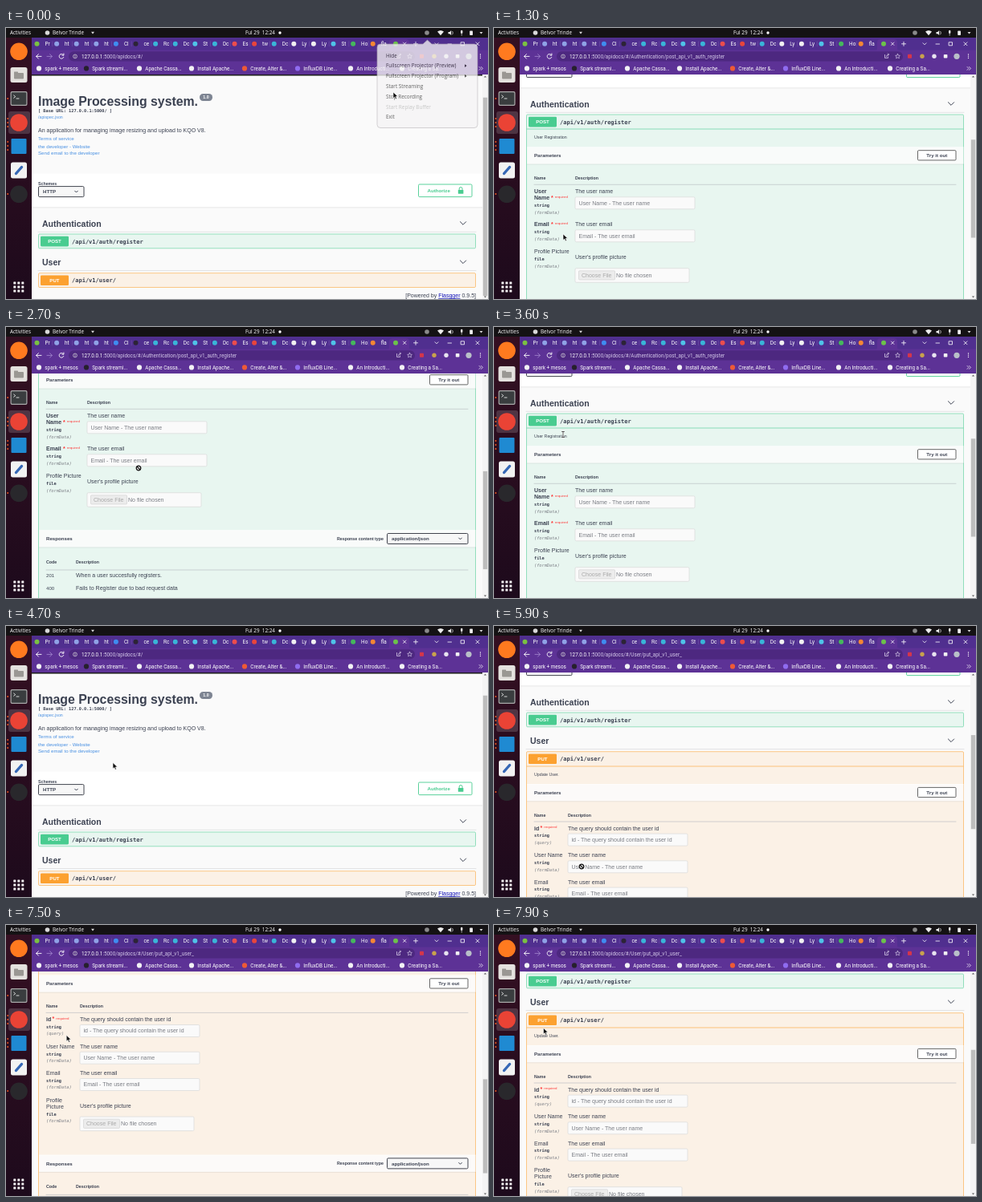
Recreate the animation shown at these times as an HTML page. Size 600 by 338 pixels, loop 8000 ms.

```html
<!DOCTYPE html>
<html lang="en">
<head>
<meta charset="utf-8">
<title>API docs walkthrough</title>
<style>
html, body { margin: 0; width: 100%; height: 100%; overflow: hidden; background: #fafafa; }
svg { display: block; width: 600px; height: 338px; font-family: "Liberation Sans", Arial, sans-serif; fill: #3b4151; }
.mono { font-family: "DejaVu Sans Mono", "Liberation Mono", monospace; }
.ui { font-family: "Open Sans", "Noto Sans", sans-serif; }
.tab { font-family: Roboto, "Open Sans", sans-serif; fill: #fff; }
.b { font-weight: bold; }
.i { font-style: italic; }
.white { fill: #fff; }
.link { fill: #4990e2; }
.soft { fill: #7a7d84; }
.req { fill: #f33; }
.line { fill: none; stroke-linecap: round; stroke-linejoin: round; }
</style>
</head>
<body>
<svg id="stage" viewBox="0 0 600 338"></svg>
<script>
const LOOP = 8000, STEP = 100;
const GREEN = '#49cc90', ORANGE = '#fca130', INK = '#3b4151';
const FRAME = '#502f8f', TOOLBAR = '#5d3296', FIELD = '#4d2880';
// text sizes of the docs page
const XS = 4.4, S = 5.27, M = 6.15, L = 7.03, XL = 10.54;

const text = (x, y, s, size, cls = '', extra = '') =>
  `<text x="${x}" y="${y + size * 0.35}" font-size="${size}" class="${cls}" ${extra}>${s}</text>`;
const rect = (x, y, w, h, fill, extra = '') =>
  `<rect x="${x}" y="${y}" width="${w}" height="${h}" fill="${fill}" ${extra}/>`;
const dot = (x, y, r, fill, extra = '') =>
  `<circle cx="${x}" cy="${y}" r="${r}" fill="${fill}" ${extra}/>`;
const path = (d, stroke, w = 0.9) =>
  `<path class="line" d="${d}" stroke="${stroke}" stroke-width="${w}"/>`;
const shape = (d, fill, extra = '') => `<path d="${d}" fill="${fill}" ${extra}/>`;
const group = (id, body) => `<g id="${id}">${body}</g>`;
const hline = (y, x1 = 50, x2 = 575, c = '#b4b8bd') => path(`M${x1} ${y}H${x2}`, c, 0.6);
const chevron = (x, y, r, c = INK, w = 1) => path(`M${x - r} ${y - r / 2}l${r} ${r} ${r} ${-r}`, c, w);

function select(x, y, w, label) {
  return rect(x, y, w, 13, '#f7f7f7', 'rx="1.3" stroke="#41444e" stroke-width="1"') +
    text(x + 5.5, y + 6.5, label, M, 'b') + chevron(x + w - 9.5, y + 6.5, 1.8);
}

function band(y, label) {
  return rect(41, y + 1, 543.5, 21.3, '#000', 'opacity=".07"') +
    rect(41, y, 543.5, 21.3, '#fff', 'opacity=".85"') + text(50, y + 10.8, label, M, 'b');
}

function section(y, name) {
  return text(45, y, name, XL, 'b') + chevron(569, y - 0.5, 3.6) + hline(y + 10.3, 40, 585, '#d0d2d6');
}

function bar(y, method, url, color) {
  return rect(43, y + 2.8, 35, 12.6, color, 'rx="1.3"') +
    text(60.5, y + 9.1, method, M, 'b white', 'text-anchor="middle"') +
    text(82, y + 9.2, url, L, 'b mono');
}

function field(x, y, w, label) {
  return rect(x, y - 7.5, w, 15, '#fafafa', 'rx="1.5" stroke="#d9d9d9" stroke-width=".7"') +
    text(x + 4.5, y, label, L, 'soft');
}

function fileField(x, y) {
  return rect(x, y - 8.8, 142, 17.6, '#fafafa', 'rx="1.5" stroke="#d9d9d9" stroke-width=".7"') +
    rect(x + 4.5, y - 5.7, 45, 11.2, '#ececec', 'rx="1" stroke="#cfcfcf" stroke-width=".6"') +
    text(x + 8, y, 'Choose File', L, '', 'fill="#aaa"') + text(x + 51, y, 'No file chosen', L, 'soft');
}

function param(x, y, p) {
  const lines = p.name.split('|');
  const last = y + (lines.length - 1) * 8;
  let out = lines.map((s, n) => text(50, y + n * 8, s, L, p.star ? 'b' : '')).join('');
  if (p.star) out += text(p.star, last - 0.8, '*', L, 'req b') + text(p.star + 4.8, last - 1.5, 'required', XS, 'req');
  out += text(50, last + 9.3, p.type || 'string', S, 'b mono');
  out += text(50, last + 17.8, `(${p.from || 'formData'})`, S, 'i mono soft');
  if (p.type) {
    const mid = y + 7;
    return out + text(x, mid, p.text, L) + fileField(x, mid + 22.5);
  }
  return out + text(x, y, p.text, L) + field(x, y + 14.3, 149, p.hint);
}

function details(y, note, descX, params, resY, responses) {
  return text(50, y + 28, note, S) + band(y + 40.3, 'Parameters') +
    rect(527.5, y + 44.7, 47.5, 12.2, '#fff', 'rx="1.1" stroke="#555" stroke-width=".9"') +
    text(551.3, y + 50.8, 'Try it out', M, 'b', 'text-anchor="middle"') +
    text(50, y + 79, 'Name', S, 'b') + text(descX, y + 79, 'Description', S, 'b') + hline(y + 87.3) +
    params.map(p => param(descX, p.y, p)).join('') +
    band(resY - 10.8, 'Responses') + text(412, resY, 'Response content type', S, 'b') +
    select(474.5, resY - 6.5, 100.5, 'application/json') +
    text(50, resY + 29, 'Code', S, 'b') + text(87, resY + 29, 'Description', S, 'b') + hline(resY + 39) +
    responses.map((r, n) =>
      text(50, resY + 46 + n * 16, r[0], M) + text(87, resY + 46 + n * 16, r[1], L)).join('');
}

const box = (id, y, color) =>
  rect(40.5, y, 544, 17.8, color,
    `id="${id}" rx="1.3" fill-opacity=".1" stroke="${color}" stroke-width=".8" stroke-opacity=".7"`);

const picture = { type: 'file', text: "User's profile picture" };
const nameHint = { text: 'The user name', hint: 'User Name - The user name' };
const mailHint = { text: 'The user email', hint: 'Email - The user email' };

const postBody = hline(275, 41, 584, GREEN) + details(257, 'User Registration', 101, [
  { y: 353, name: 'User|Name', star: 71, ...nameHint },
  { y: 394, name: 'Email', star: 71, ...mailHint },
  { y: 428, name: 'Profile Picture', ...picture }
], 506, [['201', 'When a user succesfully registers.'], ['400', 'Fails to Register due to bad request data']]);

const putBody = hline(324, 41, 584, ORANGE) + details(305.7, 'Update User.', 92, [
  { y: 401.3, name: 'id', star: 57.5, from: 'query', text: 'The query should contain the user id', hint: 'id - The query should contain the user id' },
  { y: 435, name: 'User Name', ...nameHint },
  { y: 468.3, name: 'Email', ...mailHint },
  { y: 502, name: 'Profile|Picture', ...picture }
], 581, [['200', 'When a user is succesfully updated.'], ['400', 'Fails to update due to bad request data']]);

const intro =
  rect(32, 31.5, 561, 28, '#1b1b1b') +
  text(40, 91.5, 'Image Processing system.', 15.85, 'b') +
  rect(241, 82, 16, 9, '#7d8492', 'rx="4.2"') + text(249, 86.5, '1.0', S, 'b white', 'text-anchor="middle"') +
  text(40, 103.5, '[ Base URL: 127.0.0.1:5000/ ]', S, 'b mono') +
  text(40, 111, '/apispec.json', S, 'link') +
  text(40, 127.5, 'An application for managing image resizing and upload to KQO V8.', L) +
  text(40, 138, 'Terms of service', M, 'link') +
  text(40, 148, 'the developer - Website', M, 'link') +
  text(40, 156, 'Send email to the developer', M, 'link') +
  rect(32, 182, 561, 42.3, '#000', 'opacity=".1"') + rect(32, 181.5, 561, 42, '#fff') +
  text(40, 194.3, 'Schemes', S, 'b') + select(40.5, 197.6, 56.5, 'HTTP') +
  rect(513.5, 195, 66.5, 15.6, '#fff', `rx="1.3" stroke="${GREEN}" stroke-width=".9"`) +
  text(524.5, 202.8, 'Authorize', M, 'b', `style="fill:${GREEN}"`) +
  rect(562.8, 202, 6.6, 4.8, GREEN, 'rx=".6"') + path('M564.2 202v-1.6a1.9 1.9 0 0 1 3.8 0V202', GREEN, 1);

const page =
  intro + section(244, 'Authentication') +
  box('postBox', 257, GREEN) + bar(257, 'POST', '/api/v1/auth/register', GREEN) + group('postBody', postBody) +
  group('userPart',
    section(292.3, 'User') + box('putBox', 305.7, ORANGE) +
    bar(305.7, 'PUT', '/api/v1/user/', ORANGE) + group('putBody', putBody)) +
  group('footer', text(585, 333.5,
    '[Powered by <tspan fill="#1414b8" text-decoration="underline">Flasgger</tspan> 0.9.5]', L, '', 'text-anchor="end"'));

function topBar() {
  return rect(0, 0, 600, 12, '#141214') +
    text(5, 6, 'Activities', 6.3, 'ui white') + dot(51.5, 6, 2.8, '#d9d9d9') +
    text(58, 6, 'Belvor Trinde', 6.3, 'ui white') + shape('M106 4.8h4l-2 2.6z', '#ddd') +
    text(298, 6, 'Ful 29&#160; 12:24', 6.3, 'ui white') + dot(341, 6, 1.7, '#fff') +
    dot(524, 6, 2.8, '#8a8a8a') +
    shape('M537 4.4q4-3 8 0l-4 4.8z', '#eee') +
    shape('M550.5 4.9h1.7l2-1.8v6l-2-1.8h-1.7z', '#eee') + path('M555.8 4.3q1.500 1.800 0 3.600', '#eee', 0.7) +
    rect(566, 2.800, 2.400, 4.200, '#eee', 'rx="1.2"') + path('M567.2 7.600v1.600', '#eee', 0.7) +
    rect(577.2, 3.4, 3.8, 5.6, '#eee', 'rx=".8"') + shape('M589.5 5h4l-2 2.600z', '#ddd');
}

function tabs() {
  const names = 'Pr ht ht ht Cl ce Rc Dc St Dc Es tw Dc Ly Ly St Ho fla'.split(' ');
  const tint = { Pr: '#7ac142', ht: '#8fa2e6', Cl: '#3f8cf0', ce: '#2c2436', Es: '#ec4d4d', tw: '#e8453c', Ly: '#f1f1f1', St: '#4fc3e8', Ho: '#45b85c', fla: '#f58634' };
  let out = rect(32, 12, 568, 16, FRAME) + shape('M474 28q3 0 3-3v-7q0-4 4-4h17q4 0 4 4v7q0 3 3 3z', TOOLBAR);
  names.forEach((n, k) => {
    const x = 38.5 + k * 24.6;
    out += dot(x, 19.8, 3, tint[n] || '#39b5d8') + text(x + 10, 19.8, n, 6.4, 'tab');
    if (k < 17) out += path(`M${x + 19.3} 16.8v6`, '#7a58b3', 0.5);
  });
  return out + dot(485, 19.8, 3, '#6cc24a') +
    path('M494.5 18l3.4 3.4m0-3.4l-3.4 3.4M507.5 19.8h5m-2.5-2.5v5M550 20h4.5M566.5 17.8h4v4h-4zM585 17.8l4 4m0-4l-4 4', '#fff', 0.8) +
    chevron(536, 19.8, 2, '#fff', 0.8);
}

function toolbar() {
  const marks = [
    [41, 'spark + mesos', '#f2f2f5'], [100, 'Spark streami...', '#26202c'], [166, 'Apache Cassa...', '#f2f2f5'],
    [231, 'Install Apache...', '#f2f2f5'], [297, 'Create, Alter &amp;...', '#ee5a36'], [363, 'InfluxDB Line...', '#8f6cf0'],
    [429, 'An Introducti...', '#f2f2f5'], [493, 'Creating a Sa...', '#f2f2f5']
  ];
  return rect(32, 27.5, 568, 30.5, TOOLBAR) + rect(78, 29.2, 431, 12.4, FIELD, 'rx="6.2"') +
    path('M44 35.4h-6.4m2.8-2.8l-2.8 2.8 2.8 2.8', '#fff') + path('M51 35.4h6.4m-2.8-2.8l2.8 2.8-2.8 2.8', '#9d80cb') +
    path('M71.5 33.7a2.900 2.900 0 1 0 .3 2.700M71.9 31.900v2.200h-2.200', '#fff') +
    dot(86, 35.4, 2.4, 'none', 'stroke="#ddd" stroke-width=".7"') + path('M86 35.2v1.2M86 34.2v0', '#ddd', 0.7) +
    '<text id="url" x="94" y="37.7" font-size="6.35" class="tab"></text>' +
    path('M486.5 33.4v4h4v-1.500M488.300 36q0-3 3.200-3m-1.200-1.200l1.200 1.200-1.200 1.200', '#e5dcf3', 0.7) +
    path('M502.5 32.3l.9 1.9 2 .2-1.5 1.4.5 2-1.9-1-1.9 1 .5-2-1.5-1.4 2-.2z', '#e5dcf3', 0.6) +
    rect(515, 32.8, 5, 5, '#d5364b', 'rx=".8"') + dot(533, 35.3, 2.7, '#c9a24d') + dot(548, 35.3, 2.7, '#e9e4f0') +
    rect(559.8, 33, 4.6, 4.6, '#f2f2f2', 'rx=".8"') + dot(576, 35.3, 3.6, '#b9c0c8') +
    [33, 35.2, 37.4].map(y => dot(590.5, y, 0.65, '#fff')).join('') +
    marks.map(([x, s, c]) => dot(x, 50.4, 3.1, c) + text(x + 7.3, 50.4, s, 6.35, 'tab')).join('') +
    path('M589 48.4l2 2-2 2m2.5-4l2 2-2 2', '#fff', 0.7);
}

function dock() {
  let grid = '';
  for (let k = 0; k < 9; k++) grid += rect(9.3 + k % 3 * 5, 316.5 + Math.floor(k / 3) * 5, 3, 3, '#f3f0f2', 'rx=".6"');
  const pips = [88, 113, 118, 123, 142, 147, 152, 207].map(y => dot(2.2, y, 1, '#e95420')).join('');
  return rect(0, 12, 32, 326, 'url(#dockFill)') + rect(3, 104, 27, 28, '#fff', 'rx="3" opacity=".16"') +
    dot(16, 29.3, 10.8, '#ff7a1f') +
    rect(5.5, 49, 21, 19, '#e4e1de', 'rx="2.5"') + rect(10, 56, 12, 7.5, '#9a9793', 'rx="1"') + rect(10, 54.5, 5, 3, '#9a9793', 'rx=".6"') +
    rect(5.5, 79, 21, 18, '#a9a9a9', 'rx="2"') + rect(6.7, 80.2, 18.6, 15.6, '#3a3d3f', 'rx="1.3"') +
    path('M9.7 84l2 1.6-2 1.6M13 88h3', '#fff', 0.8) +
    dot(16, 118, 10.8, '#ea4335') + rect(6.5, 138, 19, 19, '#1f8ad2', 'rx="1"') +
    rect(6, 167.5, 20, 20, '#f2f2f2', 'rx="2.5"') + path('M12.5 181.5l7-8', '#3567b5', 3.4) +
    dot(16, 207.3, 10.8, '#29282c') + pips + grid;
}

function menu() {
  const items = ['Hide', 'Fullscreen Projector (Preview)', 'Fullscreen Projector (Program)', 'Start Streaming',
    'Stop Recording', 'Start Replay Buffer', 'Exit'];
  return shape('M462 24q0-4 4-4h53l5.5-5 5.5 5h53q4 0 4 4v96.5q0 4-4 4H466q-4 0-4-4z', '#f5f4f5', 'stroke="#b5b1b5" stroke-width=".7"') +
    items.map((s, k) => text(473, 34.3 + k * 12.8, s, 6.4, 'ui', `style="fill:${k === 5 ? '#b9b9b9' : '#3a3a3a'}"`)).join('') +
    [47.1, 59.9].map(y => shape(`M571 ${y - 1.8}l2.6 1.8-2.6 1.8z`, '#333')).join('');
}

const beam = 'M-1.5-3.5h3M0-3.5v7M-1.5 3.5h3';
const pointers =
  group('arrow', shape('M0 0v7.6l1.8-1.6 1.2 2.7 1.4-.6-1.2-2.6 2.4-.2z', '#111', 'stroke="#fff" stroke-width=".6"')) +
  group('beam', path(beam, '#fff', 1.6) + path(beam, '#222', 0.7)) +
  group('no', dot(0, 0, 3.6, '#fff') + dot(0, 0, 2.8, '#ddd', 'stroke="#111" stroke-width="1.3"') + path('M-1.9-1.9l3.8 3.8', '#111', 1.3));

const stage = document.getElementById('stage');
stage.innerHTML =
  `<defs><clipPath id="view"><rect x="32" y="58" width="561" height="280"/></clipPath>
  <linearGradient id="dockFill" x2="0" y2="1"><stop stop-color="#351022"/><stop offset="1" stop-color="#1d0a1c"/></linearGradient></defs>` +
  rect(32, 58, 568, 280, '#fafafa') + `<g clip-path="url(#view)">${group('page', page)}</g>` +
  rect(593, 58, 7, 280, '#f4f4f4') + rect(593.8, 62, 5.4, 10, '#bdbdbd', 'id="thumb"') +
  shape('M594.8 61.5h3.4l-1.7-2zM594.8 334.5h3.4l-1.7 2z', '#666') +
  topBar() + tabs() + toolbar() + dock() + group('menu', menu()) + group('cursor', pointers);

const el = id => document.getElementById(id);
const move = (id, x, y) => el(id).setAttribute('transform', `translate(${x} ${y})`);
const show = (id, on) => el(id).setAttribute('visibility', on ? 'visible' : 'hidden');

// [time, scroll]; equal times make a jump
const scrollKeys = [[0, 0], [1100, 0], [1100, 149], [2300, 149], [2700, 242], [2900, 301], [3100, 301], [3500, 149],
  [3900, 149], [3900, 0], [5600, 0], [5600, 149], [6300, 149], [6700, 266], [7000, 342], [7300, 342], [7800, 196]];
// [time, x, y]
const cursorKeys = [[0, 482, 80], [200, 478, 88], [600, 230, 190], [800, 70, 300], [1000, 86, 262], [1100, 86, 257],
  [1400, 86, 257], [2000, 130, 200], [2500, 165, 176], [3200, 165, 176], [3500, 86, 134], [3600, 86, 134], [3900, 86, 117],
  [4500, 86, 126], [4900, 180, 215], [5300, 112, 325], [5600, 109, 311], [5900, 109, 300], [6200, 130, 173.5],
  [7100, 130, 173.5], [7600, 61.5, 128.5]];
const pointerKeys = [[0, 'arrow'], [2300, 'no'], [3400, 'beam'], [3700, 'arrow'], [5800, 'no'], [7200, 'arrow']];

function at(keys, t) {
  const k = keys.findLastIndex(key => key[0] <= t);
  const a = keys[k], b = keys[k + 1];
  if (!b) return a.slice(1);
  const f = (t - a[0]) / (b[0] - a[0]);
  return a.slice(1).map((v, n) => v + (b[n + 1] - v) * f);
}

function draw(time) {
  const t = Math.floor(time % LOOP / STEP) * STEP;
  const post = t >= 1100 && t < 3900, put = t >= 5600;
  const postGrow = post ? 315 : 0, putGrow = put ? 342 : 0;
  const [scroll] = at(scrollKeys, t);

  move('page', 0, -scroll);
  move('userPart', 0, postGrow);
  move('footer', 0, postGrow + putGrow);
  show('postBody', post);
  show('putBody', put);
  el('postBox').setAttribute('height', 17.8 + postGrow);
  el('putBox').setAttribute('height', 17.8 + putGrow);

  // a 28 px header above the page stays scrolled away
  const ratio = 272 / (308 + postGrow + putGrow);
  el('thumb').setAttribute('y', 62 + (scroll + 28) * ratio);
  el('thumb').setAttribute('height', 280 * ratio);

  const route = post ? 'Authentication/post_api_v1_auth_register' : put ? 'User/put_api_v1_user_' : '';
  el('url').innerHTML = `127.0.0.1<tspan fill="#d3c6e8">:5000/apidocs/#/${route}</tspan>`;

  show('menu', t < 200);
  el('menu').setAttribute('opacity', t < 100 ? 0.78 : 0.2);

  const [x, y] = at(cursorKeys, t);
  const kind = pointerKeys.findLast(key => key[0] <= t)[1];
  move('cursor', x, y);
  for (const id of ['arrow', 'beam', 'no']) show(id, id === kind);
}

const start = performance.now();
function tick() {
  draw(performance.now() - start);
  requestAnimationFrame(tick);
}
tick();
</script>
</body>
</html>
```
